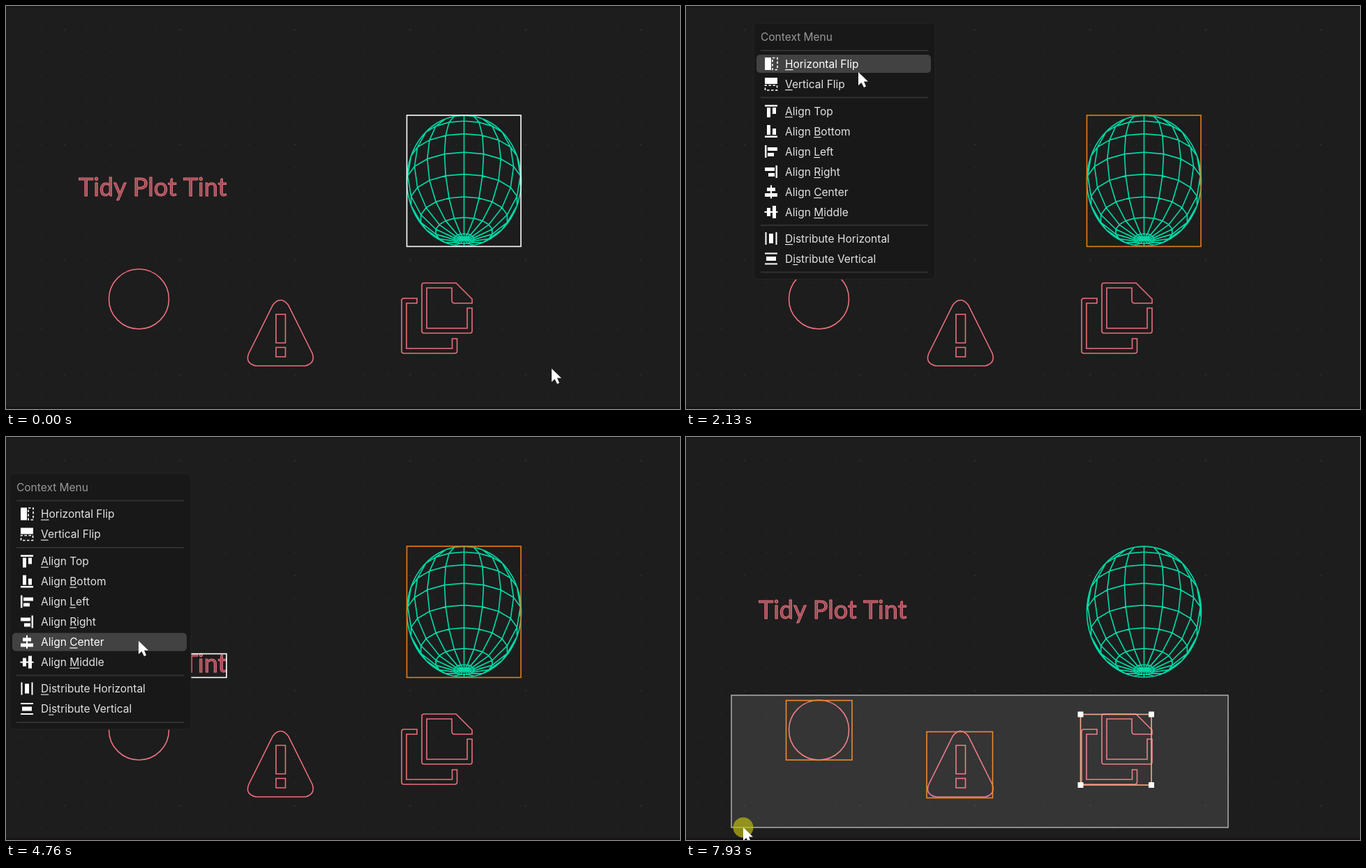
Animation of 966 by 579 pixels, one loop 8000 ms. Source, as an HTML page with a canvas:

```html
<!DOCTYPE html>
<html lang="en">
<head>
<meta charset="utf-8">
<title>Align menu</title>
<style>
html, body { margin: 0; width: 100%; height: 100%; overflow: hidden; background: #1d1d1d; }
canvas { display: block; }
</style>
</head>
<body>
<canvas id="stage" width="966" height="579"></canvas>
<script>
const ctx = document.getElementById('stage').getContext('2d');
const LOOP = 8000, PINK = '#ea707d', GREEN = '#00d6a3', ORANGE = '#e87d16', PEACH = '#f2a277';

// Pointer path: time, x, y
const path = [
  [0, 782, 521], [70, 782, 521], [420, 848, 110], [480, 839, 87], [840, 62, 365], [910, 59, 382],
  [1000, 16, 386], [1500, 306, 333], [1790, 306, 333], [2130, 247, 95], [2340, 247, 148],
  [3140, 247, 148], [3600, 221, 188], [3950, 221, 188], [4020, 214, 205], [4490, 214, 205],
  [4760, 190, 293], [5890, 190, 293], [6160, 190, 322], [6630, 190, 322], [6900, 680, 439],
  [7050, 800, 475], [7380, 777, 371], [7450, 777, 371], [7790, 40, 500], [7860, 48, 561], [7930, 82, 561],
];

const drags = [
  { from: 480, to: 980, x: 839, y: 87 },
  { from: 7380, to: 8000, x: 777, y: 371 },
];

// When each menu is open and how far it is shifted
const menus = [
  { from: 1590, to: 2600, dx: 0, dy: 0 },
  { from: 3140, to: 3680, dx: -58, dy: -2 },
  { from: 4220, to: 6230, dx: -92, dy: 27.5 },
];

// Label, index of the underlined letter, centre line
const entries = [
  ['Horizontal Flip', 0, 83], ['Vertical Flip', 0, 112], ['Align Top', 0, 151],
  ['Align Bottom', 6, 180], ['Align Left', 6, 209], ['Align Right', 6, 238],
  ['Align Center', 6, 267], ['Align Middle', 6, 296],
  ['Distribute Horizontal', 0, 334], ['Distribute Vertical', 1, 363],
];

const warning = new Path2D(`M382.5 429.5Q393.5 415.5 404.5 429.5L439 499Q444 513 429 517H358Q342 513 348 499Z
  M387 443h13.5v41h-13.5zM387 490.500h13.5v13.5h-13.5z`);
const copies = new Path2D(`M599 398H645L668 421V427H643Q639 427 639 423V405H603V463H661V434H668V467Q668 470 665 470
  H599Q596 470 596 467V401Q596 398 599 398Z
  M589 420H570Q567 420 567 423V496Q567 499 570 499H643Q646.500 499 646.500 496V478H639.500V492H574V427H589Z`);
const arrow = new Path2D('M0 0V19L4.500 15L8 22L11 20.500L8 13.500H14Z');

const active = (list, t) => list.find(e => t >= e.from && t < e.to);

function pointer(t) {
  const i = path.findIndex(k => k[0] > t);
  if (i < 0) return path.at(-1).slice(1);
  const a = path[Math.max(0, i - 1)], b = path[i];
  const p = (t - a[0]) / (b[0] - a[0] || 1);
  return [a[1] + (b[1] - a[1]) * p, a[2] + (b[2] - a[2]) * p];
}

function textTop(t) {
  if (t < 2600) return 246.5;
  if (t < 3680) return 157;
  return t < 6230 ? 311.5 : 234.5;
}

function fill(color, x, y, w, h) {
  ctx.fillStyle = color;
  ctx.fillRect(x, y, w, h);
}

function round(color, x, y, w, h, r) {
  ctx.fillStyle = color;
  ctx.beginPath();
  ctx.roundRect(x, y, w, h, r);
  ctx.fill();
}

function background() {
  fill('#1d1d1d', 0, 0, 966, 579);
  for (let i = 0; i < 29; i++) {
    for (let j = 0; j < 17; j++) {
      const major = i % 5 === 2 && j % 5 === 0;
      fill(major ? '#2b2b2b' : '#242424', 16 + i * 33.05, 33 + j * 33.05, 3, 2);
    }
  }
  fill('#171717', 0, 0, 966, 2);
  fill('#171315', 0, 576, 966, 3);
}

// Tilted wire ellipsoid, front half only
function mesh() {
  const point = (lat, lon) => {
    const x = Math.cos(lat) * Math.sin(lon), y = Math.sin(lat), z = Math.cos(lat) * Math.cos(lon);
    const c = Math.cos(0.45), s = Math.sin(0.45);
    return { x: 656.5 + 82 * x, y: 251 + 94 * (y * c - z * s), z: y * s + z * c };
  };
  const edge = (a, b) => {
    if (a.z + b.z < 0) return;
    ctx.moveTo(a.x, a.y);
    ctx.lineTo(b.x, b.y);
  };
  ctx.strokeStyle = GREEN;
  ctx.lineWidth = 1.7;
  ctx.beginPath();
  const step = Math.PI / 9;
  for (let i = -4; i <= 4; i++) {
    for (let j = 0; j < 18; j++) {
      const here = point(i * step, j * step);
      edge(here, point(i * step, (j + 1) * step));
      edge(here, point((i + 1) * step, j * step));
    }
  }
  ctx.moveTo(738.5, 251);
  ctx.ellipse(656.5, 251, 82, 94, 0, 0, 7);
  ctx.stroke();
}

function artwork(top) {
  mesh();
  ctx.strokeStyle = PINK;
  ctx.lineWidth = 1.6;
  ctx.beginPath();
  ctx.arc(190.5, 421, 43, 0, 7);
  ctx.stroke();
  ctx.stroke(warning);
  ctx.stroke(copies);
  ctx.font = '36px Lato, sans-serif';
  ctx.textBaseline = 'alphabetic';
  ctx.lineWidth = 1;
  ctx.fillStyle = 'rgba(234,112,125,.6)';
  ctx.fillText('Tidy Plot Tint', 104, top + 26);
  ctx.strokeText('Tidy Plot Tint', 104, top + 26);
}

function frame([x, y, w, h], color, handles) {
  ctx.strokeStyle = color;
  ctx.lineWidth = 1.6;
  ctx.strokeRect(x, y, w, h);
  if (!handles) return;
  for (const cx of [x, x + w]) for (const cy of [y, y + h]) fill('#fff', cx - 4, cy - 4, 8, 8);
}

function selection(t, top) {
  const text = [103, top, 213, 34], model = [574.5, 157, 163.5, 188.5];
  const drag = active(drags, t);
  if (!drag) {
    if (t < 480) return frame(model, '#fff');
    frame(model, ORANGE);
    return frame(text, '#fff');
  }
  const [px, py] = pointer(t - 35);
  const x = Math.min(px, drag.x), y = Math.min(py, drag.y);
  const w = Math.abs(px - drag.x), h = Math.abs(py - drag.y);
  const hit = b => b[0] < x + w && b[0] + b[2] > x && b[1] < y + h && b[1] + b[3] > y;
  const copyBox = [565.5, 398.5, 101.5, 101.5];
  if (t - drag.from > 60) {
    for (const box of [model, [143.5, 378.5, 94.5, 85.5], [345, 423.5, 94.5, 95], copyBox, text]) {
      const main = box === copyBox || box === text;
      if (hit(box)) frame(box, main ? PEACH : ORANGE, main);
    }
    fill('rgba(255,255,255,.105)', x, y, w, h);
    ctx.strokeStyle = '#cfcfcf';
    ctx.lineWidth = 1.2;
    ctx.strokeRect(x, y, w, h);
  }
}

function flipIcon() {
  fill('#fff', -9, -9, 9, 18);
  ctx.strokeStyle = '#fff';
  ctx.lineWidth = 1.6;
  ctx.setLineDash([3.5, 2.5]);
  ctx.strokeRect(2, -8.500, 7, 17);
  ctx.setLineDash([]);
}

function alignIcon() {
  fill('#fff', -9, -9, 18, 2.5);
  fill('#fff', -6, -5, 5, 14);
  fill('#fff', 2, -5, 5, 9);
}

function centerIcon() {
  fill('#fff', -1, -9.5, 2, 19);
  fill('#fff', -6, -6, 12, 5);
  fill('#fff', -9, 2, 18, 5);
}

function distributeIcon() {
  fill('#fff', -8.500, -9, 2, 18);
  fill('#fff', 6.500, -9, 2, 18);
  fill('#fff', -3, -7, 6, 14);
}

// Drawing, quarter turns, vertical mirror
const icons = [
  [flipIcon, 0, 1], [flipIcon, 1, 1], [alignIcon, 0, 1], [alignIcon, 0, -1], [alignIcon, -1, -1],
  [alignIcon, 1, 1], [centerIcon, 0, 1], [centerIcon, -1, 1], [distributeIcon, 0, 1], [distributeIcon, 1, 1],
];

function icon(i, y) {
  const [draw, turns, mirror] = icons[i];
  ctx.save();
  ctx.translate(122, y);
  // A mirrored left-hand turn puts the bar on the left with the long stripe first
  ctx.rotate(turns * Math.PI / 2);
  if (draw === alignIcon && turns === -1) ctx.scale(-1, 1);
  else ctx.scale(1, mirror);
  draw();
  ctx.restore();
}

function menu(m, py) {
  ctx.save();
  ctx.translate(m.dx, m.dy);
  round('#252525', 96.5, 24, 261, 369, 6);
  round('#181818', 97.5, 25, 259, 367, 5);
  for (const y of [63, 130.500, 314, 381.500]) fill('#303030', 107, y, 240, 2);
  ctx.font = '15.5px Inter, sans-serif';
  ctx.textBaseline = 'alphabetic';
  ctx.fillStyle = '#999';
  ctx.fillText('Context Menu', 107, 50);
  const distance = e => Math.abs(e[2] + m.dy - py);
  const hover = entries.reduce((a, b) => distance(b) < distance(a) ? b : a);
  entries.forEach((entry, i) => {
    const [label, key, y] = entry;
    if (entry === hover) round('#424242', 101, y - 13, 250, 26, 5);
    icon(i, y);
    const color = entry === hover ? '#fff' : '#e2e2e2';
    ctx.fillStyle = color;
    ctx.fillText(label, 142, y + 5.5);
    const start = ctx.measureText(label.slice(0, key)).width;
    fill(color, 142 + start, y + 8, Math.max(7, ctx.measureText(label[key]).width), 1.2);
  });
  ctx.restore();
}

function cursor(t, [x, y]) {
  if (active(drags, t)) {
    ctx.fillStyle = 'rgba(190,190,16,.68)';
    ctx.beginPath();
    ctx.arc(x, y, 14.5, 0, 7);
    ctx.fill();
  }
  ctx.save();
  ctx.translate(x, y);
  ctx.fillStyle = '#fff';
  ctx.fill(arrow);
  ctx.restore();
}

function render(now) {
  const t = now % LOOP, top = textTop(t), position = pointer(t), open = active(menus, t);
  background();
  artwork(top);
  selection(t, top);
  if (open) menu(open, position[1]);
  cursor(t, position);
}

let began;
function tick(now) {
  began ??= now;
  render(now - began);
  requestAnimationFrame(tick);
}
requestAnimationFrame(tick);
</script>
</body>
</html>
```
